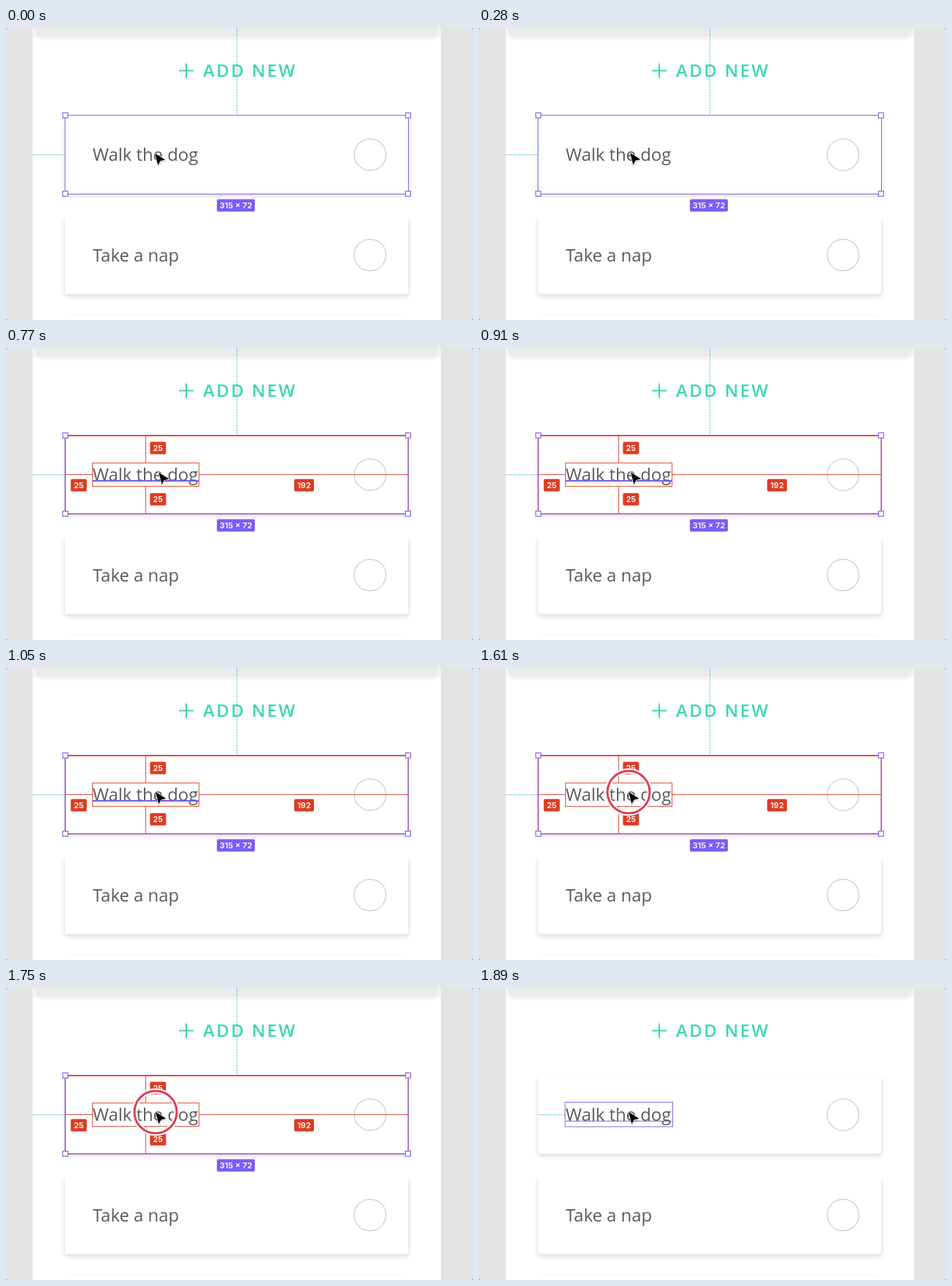
Recreate the animation shown at these times as an HTML page. Size 640 px wide and 400 px high, loop 2.31 s.

```html
<!DOCTYPE html>
<html lang="en">
<head>
<meta charset="utf-8">
<title>Measuring spacing in a to-do list</title>
<style>
  html, body { margin: 0; width: 100%; height: 100%; overflow: hidden; background: #fff; }
  svg { display: block; width: 640px; height: 400px; }
  .label { font: 400 23.9px "Open Sans", sans-serif; fill: #5a5a5a; }
  .add { font: 600 23.9px "Open Sans", sans-serif; fill: #3ad9b0; letter-spacing: 2.4px; }
  .badge text { font: 600 11px Inter, sans-serif; fill: #fff; text-anchor: middle; }
  .line { fill: none; stroke-width: 1; }
  .guide { stroke: #5bb8cf; stroke-dasharray: 2 1.5; }
  .red { stroke: #d9583f; }
  .violet { stroke: #8468e0; }
</style>
</head>
<body>
<svg viewBox="0 0 640 400">
  <defs>
    <filter id="soft" x="-10%" y="-20%" width="120%" height="150%"><feGaussianBlur stdDeviation="2.4"/></filter>
    <g id="card">
      <rect x="79" y="3" width="474" height="109" rx="6" fill="#000" opacity=".1" filter="url(#soft)"/>
      <rect x="81" width="470" height="107.5" rx="4" fill="#fff"/>
      <circle cx="499" cy="54" r="21.7" fill="none" stroke="#cdcdcd" stroke-width="1.3"/>
    </g>
  </defs>

  <rect width="640" height="400" fill="#fff"/>
  <path d="M36.5 0H596V11L584 16.5H49L36.5 11Z" fill="#f4f4f4"/>
  <path d="M39 0H594Q592 12 582 12H51Q41 12 39 0Z" fill="#ebebeb"/>
  <path d="M0 0H36.5V400H0ZM596 0H640V400H596Z" fill="#e4e4e4"/>
  <path d="M0 0h2l-2 2zM640 0h-2l2 2zM0 400h2l-2-2zM640 400h-2l2-2z" fill="#999"/>

  <path d="M237 58.5H257M247 48.5V68.5" stroke="#3ad9b0" stroke-width="2"/>
  <text class="add" x="270" y="67">ADD NEW</text>

  <use href="#card" y="119.5"/>
  <use href="#card" y="257"/>
  <path d="M86 393.5H546" stroke="#f0f0f0"/>
  <text class="label" x="118.8" y="182">Walk the dog</text>
  <text class="label" x="118.8" y="319.5">Take a nap</text>

  <g id="select">
    <path class="line guide" d="M316.5 0V119M36.5 173.5H81"/>
    <rect class="line" x="81" y="119.5" width="470.5" height="108" stroke="#8468e0" stroke-width="1.5"/>
    <g class="badge">
      <rect x="289" y="234.5" width="52" height="17" rx="2" fill="#7b5cf5"/>
      <text x="315" y="247">315 × 72</text>
    </g>
  </g>
  <path id="hover" d="M119 182H264" stroke="#7b5cf5" stroke-width="2"/>
  <g id="measure">
    <rect class="line" x="81.3" y="120" width="469.7" height="107" stroke="#b04098" stroke-width="1.8"/>
    <path class="line red" d="M82 120.5H551M191.5 120V157M191.5 190V227M81 173.5H118M265 173.5H551"/>
    <rect class="line red" x="118.5" y="157.5" width="146" height="32"/>
    <g class="badge" id="gaps"></g>
  </g>
  <g id="handles" fill="#fff" stroke="#8468e0" stroke-width="1.2"></g>
  <g id="picked">
    <path class="line guide" d="M81 173.5H118M190.5 168V180"/>
    <rect class="line violet" x="118" y="156.5" width="147.5" height="33.5" stroke-width="1.3"/>
    <path class="line violet" d="M119 182.3H264"/>
  </g>
  <g id="ring" fill="none">
    <circle cx="205" cy="170" r="29" stroke="#fff" stroke-width="7"/>
    <circle cx="205" cy="170" r="29" stroke="#de3d55" stroke-width="3"/>
  </g>
  <path id="cursor" d="M0 0L4.3 16.5L7.7 10.6L14.3 9Z" fill="#000" stroke="#fff" stroke-width="1.4"
    stroke-linejoin="round" paint-order="stroke" style="filter:drop-shadow(0 1px 1px #0004)"/>
</svg>
<script>
const $ = id => document.getElementById(id);
const LOOP = 2310;

$('gaps').innerHTML = [[208.3, 137, 25], [99.7, 188, 25], [208.3, 207.3, 25], [408.5, 188, 192]]
  .map(([x, y, n]) => {
    const w = n > 99 ? 27 : 22;
    return `<rect x="${x - w / 2}" y="${y - 8.5}" width="${w}" height="17" rx="2" fill="#dc3c24"/>
      <text x="${x}" y="${y + 4}">${n}</text>`;
  }).join('');
$('handles').innerHTML = [81.3, 551].flatMap(x => [119.7, 227].map(y =>
  `<rect x="${x - 3.5}" y="${y - 3.5}" width="7" height="7"/>`)).join('');

// Start time, cursor tip, visible layers
const steps = [
  [0, 204, 171.5, 'select handles'],
  [280, 207, 171, 'select handles'],
  [350, 209.3, 170.5, 'select handles'],
  [770, 209.3, 170.5, 'select handles measure hover'],
  [910, 208, 170.2, 'select handles measure hover'],
  [980, 206, 169.8, 'select handles measure hover'],
  [1050, 205, 169.8, 'select handles measure hover'],
  [1610, 205, 169.8, 'select handles measure ring'],
  [1680, 205, 169.8, 'select handles measure'],
  [1750, 205, 169.8, 'select handles measure ring'],
  [1820, 205, 169.8, 'picked']
];
const layers = ['select', 'handles', 'measure', 'hover', 'ring', 'picked'];

function draw(now) {
  const t = now % LOOP;
  const [, x, y, shown] = steps.findLast(s => s[0] <= t);
  const on = shown.split(' ');
  for (const id of layers) $(id).style.display = on.includes(id) ? '' : 'none';
  $('cursor').setAttribute('transform', `translate(${x} ${y})`);
}

const start = performance.now();
function tick() {
  draw(performance.now() - start);
  requestAnimationFrame(tick);
}
tick();
</script>
</body>
</html>
```
